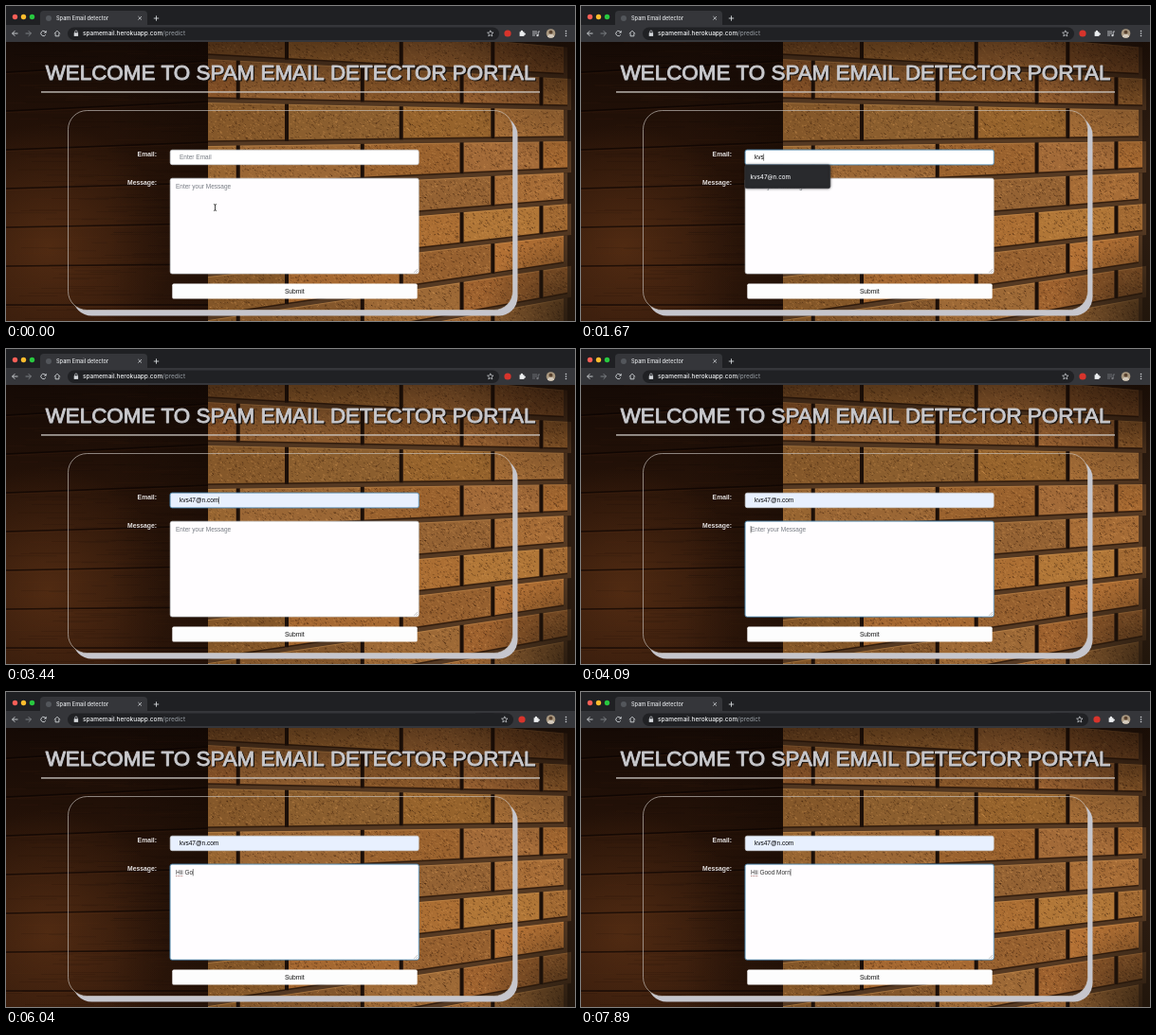
Recreate the animation shown at these times as an HTML page with a canvas. Size 600 by 333 pixels, loop 7990 ms.

```html
<!DOCTYPE html>
<html lang="en">
<head>
<meta charset="utf-8">
<title>Spam Email detector</title>
<style>
html, body { margin: 0; width: 100%; height: 100%; overflow: hidden; background: #1d0e07; }
canvas { display: block; width: 600px; height: 333px; }
</style>
</head>
<body>
<canvas id="stage"></canvas>
<script>
const W = 600, H = 333, LOOP = 7990;
const SANS = '"Liberation Sans", Arial, sans-serif';
const UI = 'Inter, Roboto, sans-serif';
const BODY = '6.5px ' + SANS;
const ICON = '#d3d6da';
const EMAIL = 'kvs47@n.com';
const SAVED = ['ro.melk47@example.com', 'taruni@e.com', 'Quietlessons@example.org',
  'clerk@r.com', 'rental.nomailback@example.com', 'ro.melk@example.com'];

const dpr = window.devicePixelRatio || 1;
const makeCtx = canvas => {
  canvas.width = Math.round(W * dpr);
  canvas.height = Math.round(H * dpr);
  const c = canvas.getContext('2d');
  c.scale(dpr, dpr);
  return c;
};
const stage = makeCtx(document.getElementById('stage'));
const backdrop = document.createElement('canvas');
let g = makeCtx(backdrop);

const lerp = (a, b, t) => a + (b - a) * t;
const clamp = v => Math.max(0, Math.min(1, v));
let seed = 17;
const rnd = () => (seed = (seed * 16807) % 2147483647) / 2147483647;

function rect(x, y, w, h, fill) {
  g.fillStyle = fill;
  g.fillRect(x, y, w, h);
}
function round(x, y, w, h, r, fill, stroke, lw = 1) {
  g.beginPath();
  g.roundRect(x, y, w, h, r);
  if (fill) { g.fillStyle = fill; g.fill(); }
  if (stroke) { g.strokeStyle = stroke; g.lineWidth = lw; g.stroke(); }
}
function dot(x, y, r, fill) {
  g.beginPath();
  g.arc(x, y, r, 0, 7);
  g.fillStyle = fill;
  g.fill();
}
function line(points, color, lw = 1) {
  g.beginPath();
  for (let i = 0; i < points.length; i += 2) g.lineTo(points[i], points[i + 1]);
  g.strokeStyle = color;
  g.lineWidth = lw;
  g.stroke();
}
function poly(points, fill) {
  g.beginPath();
  for (let i = 0; i < points.length; i += 2) g.lineTo(points[i], points[i + 1]);
  g.closePath();
  g.fillStyle = fill;
  g.fill();
}
function text(str, x, y, font, fill, align = 'left') {
  g.font = font;
  g.fillStyle = fill;
  g.textAlign = align;
  g.fillText(str, x, y);
}
function widthOf(str) {
  g.font = BODY;
  return g.measureText(str).width;
}
// soft spot of one colour (given as "r,g,b") fading to nothing
function glow(x, y, r, rgb, alpha) {
  const spot = g.createRadialGradient(x, y, 0, x, y, r);
  spot.addColorStop(0, `rgba(${rgb},${alpha})`);
  spot.addColorStop(1, `rgba(${rgb},0)`);
  rect(x - r, y - r, 2 * r, 2 * r, spot);
}

function drawPlanks() {
  g.save();
  g.beginPath();
  g.rect(0, 38, 214, 295);
  g.clip();
  const base = g.createLinearGradient(0, 38, 0, 333);
  base.addColorStop(0, '#150a05');
  base.addColorStop(0.4, '#271308');
  base.addColorStop(1, '#32190b');
  rect(0, 38, 214, 295, base);
  glow(45, 255, 130, '104,56,24', 0.6);
  for (let i = 0; i < 260; i++) {
    const y = 38 + rnd() * 295, x = rnd() * 190;
    rect(x, y, 15 + rnd() * 60, 0.5, rnd() < 0.6 ? 'rgba(12,4,0,.22)' : 'rgba(110,60,28,.12)');
  }
  for (let k = 0; k < 8; k++) {
    const l = 70 + k * 41, r = 58 + k * 43;
    line([0, l, 213, r], 'rgba(8,3,1,.65)', 1.6);
    line([0, l + 1.6, 213, r + 1.6], 'rgba(110,62,30,.2)', 0.7);
  }
  const side = g.createLinearGradient(110, 0, 214, 0);
  side.addColorStop(0, 'rgba(14,6,2,0)');
  side.addColorStop(1, 'rgba(14,6,2,.4)');
  rect(110, 38, 104, 295, side);
  g.restore();
}

const BRICK_L = 213, BRICK_R = 595;
const rowY = (x, k) => lerp(10 + 46 * k, 44 + 33 * k, (x - BRICK_L) / (BRICK_R - BRICK_L));
// bricks shorten toward a far point to the right
const nextJoint = x => x + 0.2 * (902 - x);

function drawBrick(x0, x1, k) {
  const light = clamp((x0 - 180) / 300);
  const tone = 35 + light * 7 + (rnd() - 0.5) * 9;
  const a = rowY(x0, k), b = rowY(x1, k), c = rowY(x1, k + 1) - 5, d = rowY(x0, k + 1) - 5;
  poly([x0, a, x1, b, x1, c, x0, d], `hsl(${27 + rnd() * 4},${48 + rnd() * 7}%,${tone}%)`);
  line([x0, a + 0.6, x1, b + 0.6], 'rgba(226,170,105,.35)', 0.9);
  line([x0, d, x1, c], 'rgba(30,14,5,.75)', 1.5);
  for (let i = (x1 - x0) * 5; i > 0; i--) {
    const x = lerp(x0 + 0.5, x1 - 2, rnd());
    const y = lerp(rowY(x, k) + 1, rowY(x, k + 1) - 7, rnd());
    line([x, y, x + 0.5 + rnd() * 1.6, y + rnd() * 1.6],
      rnd() < 0.5 ? 'rgba(45,20,6,.5)' : 'rgba(222,160,92,.4)', 0.4 + rnd() * 0.6);
  }
}

function drawWall() {
  g.save();
  g.beginPath();
  g.rect(BRICK_L, 38, W - BRICK_L, H);
  g.clip();
  rect(BRICK_L, 38, W - BRICK_L, H, '#2c1c11');
  for (let k = 0; k < 10; k++) {
    const end = k % 2 ? 596 : 592;
    poly([BRICK_L, rowY(BRICK_L, k), end, rowY(end, k), end, rowY(end, k + 1), BRICK_L, rowY(BRICK_L, k + 1)], '#553922');
    let x = k % 2 ? 83 : 147;
    while (x < end - 4) {
      const next = Math.min(nextJoint(x), end);
      const edge = next - 4;
      if (next > BRICK_L) {
        drawBrick(Math.max(x, BRICK_L), edge, k);
        if (next < end) {
          poly([edge, rowY(next, k), next, rowY(next, k), next, rowY(next, k + 1) - 4,
            edge, rowY(next, k + 1) - 4], '#1c0f08');
        }
      }
      x = next;
    }
  }
  const top = g.createLinearGradient(0, 38, 0, 110);
  top.addColorStop(0, 'rgba(20,9,3,.5)');
  top.addColorStop(1, 'rgba(20,9,3,0)');
  rect(BRICK_L, 38, W, 72, top);
  glow(590, 38, 130, '20,9,3', 0.55);
  glow(600, 333, 100, '30,20,10', 0.8);
  g.restore();
}

function drawBrowser() {
  rect(0, 0, W, 21, '#1f2023');
  round(36, 5, 113, 22, 4, '#35363a');
  rect(0, 20, W, 18, '#35363a');
  ['#ff5f57', '#febc2e', '#28c840'].forEach((c, i) => dot(9.5 + i * 9, 11.5, 2.7, c));
  dot(45, 13, 3, '#53565b');
  text('Spam Email detector', 53, 15, '500 5.6px ' + UI, '#e6e8eb');
  line([139.4, 11, 143, 14.6], ICON, 0.8);
  line([143, 11, 139.4, 14.6], ICON, 0.8);
  line([155.8, 13, 161.2, 13], ICON, 0.9);
  line([158.5, 10.3, 158.5, 15.7], ICON, 0.9);

  line([12.5, 29, 6.6, 29], ICON, 0.9);
  line([9.4, 26.2, 6.6, 29, 9.4, 31.8], ICON, 0.9);
  line([20.6, 29, 26.5, 29], '#85888d', 0.9);
  line([23.7, 26.2, 26.5, 29, 23.7, 31.8], '#85888d', 0.9);
  g.beginPath();
  g.arc(39.5, 29, 2.7, 0.5, 5.5);
  g.strokeStyle = ICON;
  g.lineWidth = 0.9;
  g.stroke();
  poly([42.6, 25.8, 42.6, 28.6, 39.8, 28.6], ICON);
  line([51, 29.2, 54, 26.2, 57, 29.2], ICON, 0.9);
  line([52.1, 28.6, 52.1, 31.8, 55.9, 31.8, 55.9, 28.6], ICON, 0.9);

  round(65, 22.5, 455, 13.5, 6.7, '#202124');
  rect(71.7, 28.3, 4.4, 3.6, ICON);
  round(72.6, 26, 2.6, 4, 1.3, null, ICON, 0.7);
  const host = 'spamemail.herokuapp.com';
  text(host, 81, 31.3, '500 6.5px ' + UI, '#eef0f2');
  text('/predict', 81 + g.measureText(host).width, 31.3, '6.5px ' + UI, '#9aa0a6');

  g.save();
  g.beginPath();
  g.arc(574.5, 29, 4.8, 0, 7);
  g.clip();
  rect(569, 24, 11, 11, '#a99880');
  dot(574.5, 27.8, 2, '#59422f');
  dot(574.5, 33.6, 3.8, '#d5cbbd');
  g.restore();
  for (let i = -1; i < 2; i++) dot(590.5, 29 + i * 2.5, 0.8, ICON);
}

function drawCard() {
  const title = 'WELCOME TO SPAM EMAIL DETECTOR PORTAL';
  const heading = (x, y, color) => {
    text(title, x, y, '22.4px ' + SANS, color, 'center');
    g.strokeStyle = color;
    g.lineWidth = 0.9;
    g.lineJoin = 'round';
    g.strokeText(title, x, y);
  };
  heading(301.2, 79.2, '#17120f');
  heading(300, 78, '#c9c9cd');
  rect(37, 90.3, 526, 1.3, '#cfcac6');

  // offset shadow, cut out behind the card
  g.save();
  const hole = new Path2D();
  hole.rect(0, 0, W, H);
  hole.roundRect(65.5, 110.5, 469, 211, 20);
  g.clip(hole, 'evenodd');
  round(70.5, 116.5, 469, 211, 20, '#c6c6cd');
  g.restore();
  round(65.5, 110.5, 469, 211, 20, null, 'rgba(205,200,195,.8)', 0.8);

  text('Email:', 159, 159, 'bold 6.8px ' + SANS, '#e3e0e0', 'right');
  text('Message:', 159, 189.4, 'bold 6.8px ' + SANS, '#e3e0e0', 'right');
  round(175.3, 293.6, 258.4, 16, 1.6, '#fdfdfd');
  text('Submit', 304.3, 304, '6.7px ' + SANS, '#151515', 'center');
}

drawPlanks();
drawWall();
drawBrowser();
drawCard();
g = stage;

// the moments at which each key lands
const MAIL_KEYS = [1020, 1300, 1580];
const NOTE_KEYS = [4550, 4730, 4920, 5110, 5850, 6030, 6220, 6310, 6960, 7240, 7430, 7610, 7800];
const keysBy = (keys, t) => keys.filter(k => k <= t).length;
const NOTE = 'Hii Good Morn';
const FOCUS = 650, OPEN = 740, PICK = 2600, ACCEPT = 2970, TAB = 3900;
const MEDIA_PAUSE = 3250, MEDIA_GONE = 5850;

// the media button dims, then leaves, and its neighbours move right
function drawTools(t) {
  const gone = t >= MEDIA_GONE;
  g.save();
  if (gone) {
    g.translate(15, 0);
    round(480, 22.5, 40, 13.5, 6.7, '#202124');
    rect(480, 22.5, 30, 13.5, '#202124');
  }
  const star = [];
  for (let i = 0; i <= 10; i++) {
    const r = i % 2 ? 1.5 : 3.4, a = i * Math.PI / 5 - Math.PI / 2;
    star.push(510.8 + r * Math.cos(a), 29.2 + r * Math.sin(a));
  }
  line(star, ICON, 0.7);
  dot(529, 29, 3.6, '#d8342c');
  rect(541.6, 27.3, 4.8, 4.6, '#eceef0');
  dot(543.9, 26.9, 1.2, '#eceef0');
  dot(546.6, 29.6, 1.2, '#eceef0');
  g.restore();
  if (gone) return;
  const color = t < MEDIA_PAUSE ? ICON : '#77797e';
  for (let i = 0; i < 3; i++) line([555, 27 + i * 2, i < 2 ? 560 : 558, 27 + i * 2], color, 0.8);
  line([561.2, 31.4, 561.2, 27, 563, 27], color, 0.8);
  dot(560.4, 31.2, 1.1, color);
}

function field(y, h, fill, focus) {
  if (focus > 0) round(172.4, y - 0.8, 263.6, h + 1.6, 3, `rgba(50,110,160,${0.5 * focus})`);
  round(173.2, y, 262, h, 2, fill, focus > 0.5 ? '#6ba3c6' : '#ced4da', 0.7);
}

function caret(x, y, t, since) {
  if ((t - since) % 1000 < 500) rect(x, y, 0.6, 7.4, '#333');
}

function drawMail(t) {
  const n = keysBy(MAIL_KEYS, t);
  const filled = t >= PICK;
  const focus = clamp((t - FOCUS + 60) / 150) * (1 - clamp((t - TAB) / 150));
  field(152.2, 15.5, filled ? '#e8f0fe' : '#fff', t < FOCUS ? 0 : focus);
  const value = filled ? EMAIL : EMAIL.slice(0, n);
  if (value) text(value, 183, 162.3, BODY, '#000');
  else text('Enter Email', 183, 162.3, BODY, '#757b82');
  const picking = t >= PICK && t < ACCEPT;
  if (t >= FOCUS && t < TAB && !picking) {
    const last = t >= ACCEPT ? ACCEPT : n ? MAIL_KEYS[n - 1] : FOCUS;
    caret(182.7 + widthOf(value), 156.3, t, last);
  }
}

function drawNote(t) {
  const n = keysBy(NOTE_KEYS, t);
  field(182.2, 100.8, '#fffdff', clamp((t - TAB + 40) / 150) * (t >= TAB));
  for (let i = 0; i < 2; i++) line([434 - 2 - i * 2, 282, 434, 280 - i * 2], '#999', 0.5);
  const value = NOTE.slice(0, n);
  if (n) text(value, 179, 193, BODY, '#333');
  else text('Enter your Message', 179, 193, BODY, '#757b82');
  if (n > 3) {
    for (let i = 0; i < 5; i++) rect(179 + i * 1.6, 194.2, 0.9, 0.8, '#9a5a56');
  }
  if (t >= TAB) caret(178.8 + widthOf(value), 187, t, n ? NOTE_KEYS[n - 1] : TAB);
}

function drawList(t) {
  if (t < OPEN || t >= ACCEPT) return;
  const items = t < MAIL_KEYS[0] ? SAVED : [EMAIL];
  const w = items.length > 1 ? 112.5 : 90;
  const h = 7.8 + items.length * 16.9;
  g.save();
  g.shadowColor = 'rgba(0,0,0,.5)';
  g.shadowBlur = 3 * dpr;
  round(172.8, 168, w, h, 2, '#292a2d', '#3e3f43', 0.6);
  g.restore();
  if (t >= PICK) rect(173, 172, w - 0.4, 16.9, '#434448');
  items.forEach((s, i) => text(s, 178.5, 183.2 + i * 16.9, '500 6.2px ' + UI, '#eceef1'));
}

function drawPointer(t) {
  if (t >= MAIL_KEYS[0]) return;
  const p = clamp((t - 20) / 440), e = p * p * (3 - 2 * p);
  const x = lerp(220.5, 222.3, e), y = lerp(213, 160.3, e);
  const shape = (color, lw) => {
    line([x, y - 2.9, x, y + 2.9], color, lw);
    line([x - 1.5, y - 3.5, x, y - 2.8, x + 1.5, y - 3.5], color, lw);
    line([x - 1.5, y + 3.5, x, y + 2.8, x + 1.5, y + 3.5], color, lw);
  };
  shape('rgba(255,255,255,.9)', 1.7);
  shape('#111', 0.8);
}

function render(t) {
  g.drawImage(backdrop, 0, 0, W, H);
  drawTools(t);
  drawMail(t);
  drawNote(t);
  drawList(t);
  drawPointer(t);
}

const start = performance.now();
function tick() {
  render((performance.now() - start) % LOOP);
  requestAnimationFrame(tick);
}
tick();
</script>
</body>
</html>
```
